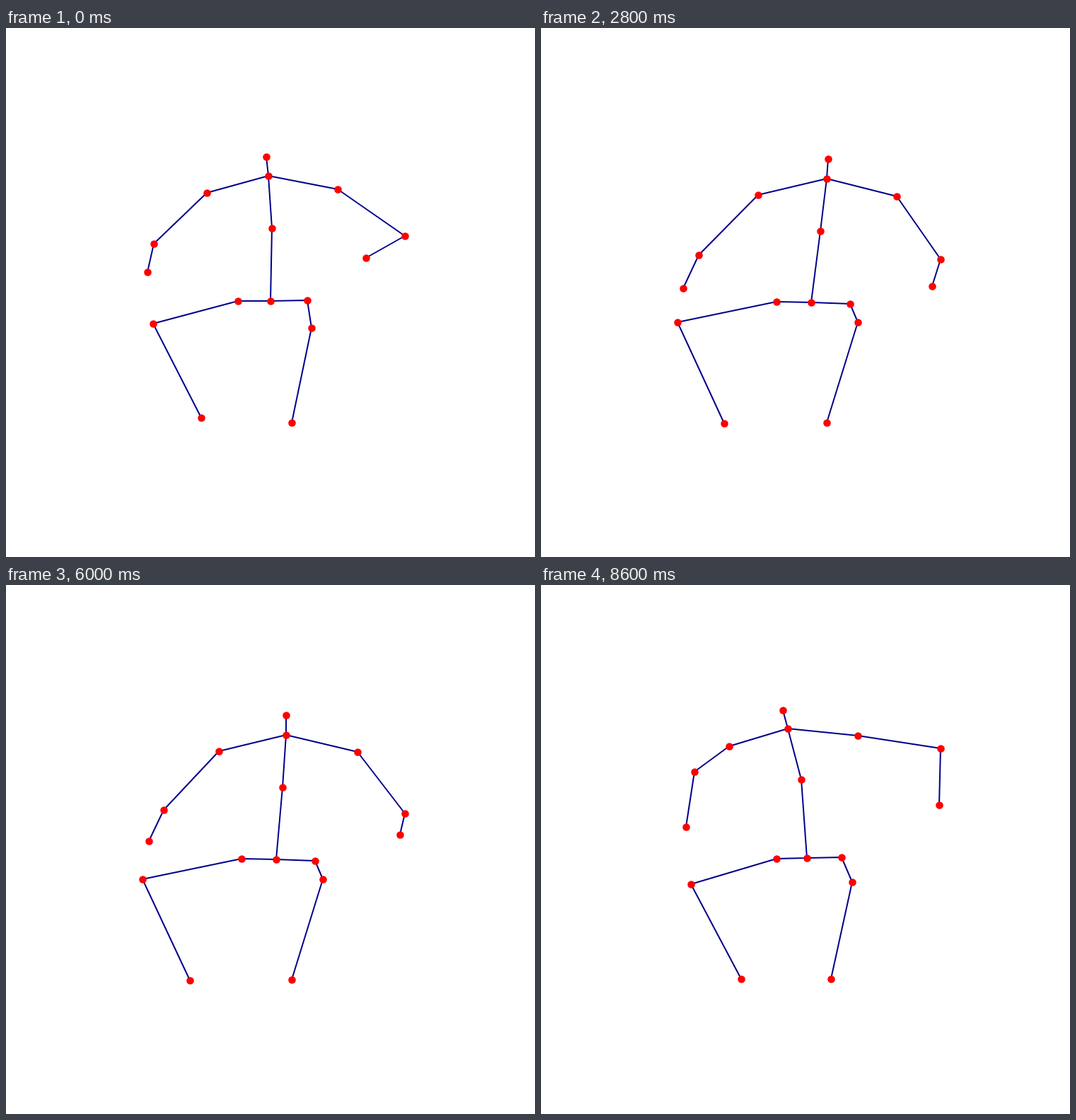
Recreate the animation shown at these times as an HTML page with a canvas. Size 748 by 748 pixels, loop 8700 ms.

```html
<!DOCTYPE html>
<html lang="en">
<head>
<meta charset="utf-8">
<title>Stick figure</title>
<style>
html, body { margin: 0; width: 100%; height: 100%; overflow: hidden; background: #fff; }
canvas { display: block; width: 748px; height: 748px; }
</style>
</head>
<body>
<canvas id="stage" width="748" height="748"></canvas>
<script>
const ctx = document.getElementById('stage').getContext('2d');
const LOOP = 8700, STEP = 100;
const SETTLE_END = 3600, RISE_START = 5100, RISE_END = 8600;
const LEAN_PIVOT = 345;

const clamp = v => Math.min(1, Math.max(0, v));
const progress = (t, from, to) => clamp((t - from) / (to - from));
const mix = (a, b, k) => a + (b - a) * k;
const mixPoint = (a, b, k) => [mix(a[0], b[0], k), mix(a[1], b[1], k)];
const swell = (t, from, to) => Math.sin(Math.PI * progress(t, from, to));

const settling = t => 1 - (1 - progress(t, 0, SETTLE_END)) ** 2;
const turning = t => swell(t, 6600, RISE_END);
const leaning = t => 0.062 * swell(t, 600, SETTLE_END) + 0.055 * turning(t);

// Eases from start into the settled pose and on to the end pose.
// The body leans above the pivot; tuck pulls a joint sideways in the turn.
function joint(start, settled, end, tuck = 0, power = 2) {
  return t => {
    const rise = progress(t, RISE_START, RISE_END) ** power;
    const [x, y] = mixPoint(mixPoint(start, settled, settling(t)), end, rise);
    const lean = leaning(t) * Math.max(0, LEAN_PIVOT - y);
    return [Math.round(x + lean + tuck * turning(t)), Math.round(y)];
  };
}

const head = joint([368, 182], [400, 185], [342, 177]);
const neck = joint([371, 209], [399, 213], [349, 203]);
const spine = joint([376, 283], [393, 287], [368, 275]);

const leftShoulder = joint([284, 233], [303, 236], [266, 228], 12);
const leftElbow = joint([209, 305], [223, 322], [217, 264], 17);
const leftHand = joint([200, 345], [201, 369], [205, 342], -2, 1);

const rightShoulder = joint([469, 228], [500, 238], [448, 213], -10);
const rightElbow = joint([564, 294], [564, 329], [565, 231], -4);
const rightHand = joint([509, 325], [555, 367], [563, 311], -15, 1);

const leftHip = joint([328, 386], [333, 387], [333, 387], 8);
const leftKnee = joint([208, 418], [192, 416], [212, 423], 29);
const leftFoot = joint([276, 551], [258, 559], [283, 557], 12);

const rightHip = joint([426, 385], [438, 390], [425, 385]);
const rightKnee = joint([432, 424], [449, 416], [440, 420]);
const rightFoot = joint([404, 558], [404, 558], [410, 557]);

const pelvis = t => mixPoint(leftHip(t), rightHip(t), 0.47).map(Math.round);

const limbs = [
  [head, neck, spine, pelvis],
  [neck, leftShoulder, leftElbow, leftHand],
  [neck, rightShoulder, rightElbow, rightHand],
  [pelvis, leftHip, leftKnee, leftFoot],
  [pelvis, rightHip, rightKnee, rightFoot]
];
const joints = [...new Set(limbs.flat())];

function draw(t) {
  ctx.fillStyle = '#fff';
  ctx.fillRect(0, 0, 748, 748);

  ctx.strokeStyle = '#00008b';
  ctx.lineWidth = 2;
  ctx.lineJoin = 'round';
  ctx.beginPath();
  for (const limb of limbs) {
    limb.forEach((at, i) => ctx[i ? 'lineTo' : 'moveTo'](...at(t)));
  }
  ctx.stroke();

  ctx.fillStyle = '#f00';
  for (const at of joints) {
    const [x, y] = at(t);
    ctx.beginPath();
    ctx.arc(x + 0.5, y + 0.5, 5.3, 0, Math.PI * 2);
    ctx.fill();
  }
}

const begin = performance.now();
function tick() {
  const t = (performance.now() - begin) % LOOP;
  draw(Math.floor(t / STEP) * STEP);
  requestAnimationFrame(tick);
}
tick();
</script>
</body>
</html>
```
